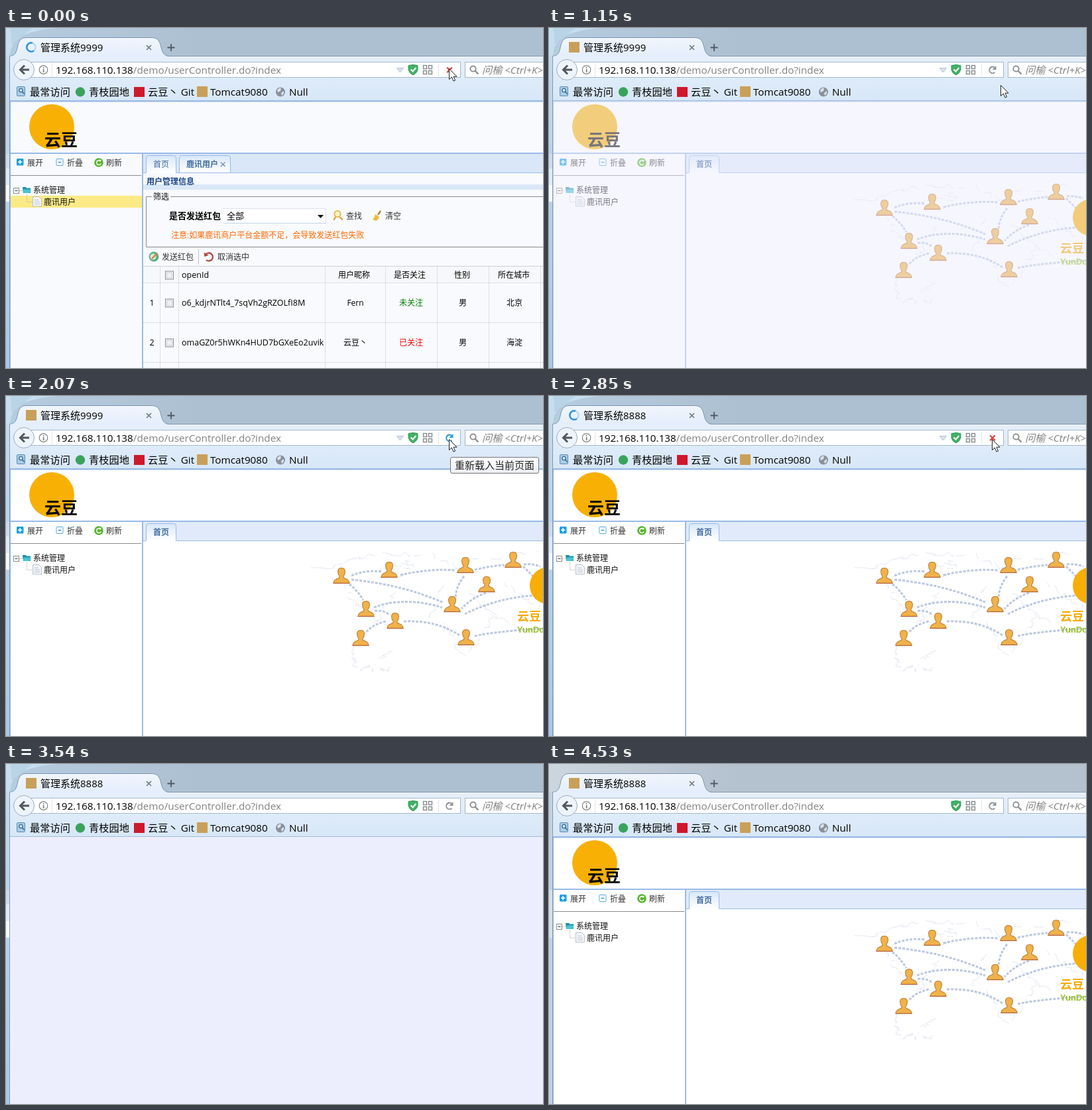
Write an HTML page that moves like this. It is 810 by 513 pixels and loops after 4630 ms.

```html
<!DOCTYPE html>
<html lang="zh">
<head>
<meta charset="utf-8">
<title>管理系统</title>
<style>
html, body { margin: 0; width: 100%; height: 100%; overflow: hidden; }
svg { display: block; width: 810px; height: 513px; font-family: "Open Sans", "Noto Sans CJK SC", "Noto Sans CJK", sans-serif; }
text { white-space: pre; }
</style>
</head>
<body>
<svg id="stage" viewBox="0 0 810 513" xmlns="http://www.w3.org/2000/svg"></svg>
<script>
const LOOP = 4630;
const stage = document.getElementById('stage');

const text = (x, y, s, size = 12, fill = '#111', more = '') =>
  `<text x="${x}" y="${y}" font-size="${size}" fill="${fill}" ${more}>${s}</text>`;
const rect = (x, y, w, h, fill, more = '') =>
  `<rect x="${x}" y="${y}" width="${w}" height="${h}" fill="${fill}" ${more}/>`;
const path = (d, stroke, w = 1, fill = 'none', more = '') =>
  `<path d="${d}" stroke="${stroke}" stroke-width="${w}" fill="${fill}" ${more}/>`;
const circle = (x, y, r, fill, stroke = 'none', w = 1) =>
  `<circle cx="${x}" cy="${y}" r="${r}" fill="${fill}" stroke="${stroke}" stroke-width="${w}"/>`;
const group = (id, body, more = '') => `<g id="${id}" ${more}>${body}</g>`;
const grad = (id, a, b, dir = 'x2="0" y2="1"') =>
  `<linearGradient id="${id}" ${dir}><stop stop-color="${a}"/><stop offset="1" stop-color="${b}"/></linearGradient>`;
const BOLD = 'font-weight="bold"';
const MID = 'text-anchor="middle"';
const LINE = '#99bbe8';
const UI = 15.25;

function random(seed) {
  return () => (seed = (seed * 16807) % 2147483647) / 2147483647;
}

function defs() {
  return '<defs>' + grad('tabFill', '#f1f6fd', '#e4eefb') + grad('bar', '#e6effb', '#d7e7f7') +
    grad('pageTab', '#d9e7f9', '#ffffff') + grad('tipFill', '#ffffff', '#eceef5') +
    grad('glass', '#b6cddf', '#adc0d2', 'x2="0.35"') + grad('side', '#c3d9ec', '#aac8e6') +
    grad('gray', '#ccd6df', '#b4c1ce', 'x2="0.35"') + '</defs>';
}

function frameBack() {
  const blue = rect(0, 0, 810, 513, 'url(#glass)') +
    path('M0 0H76Q40 3 17 15Q6 28 6 43H0Z', 'none', 0, '#c6deee') +
    path('M6 0H40L8 25V10Z', 'none', 0, '#b9d4e6') +
    rect(0, 43, 6, 470, 'url(#side)') + rect(0, 190, 6, 22, '#cbdcef') +
    rect(0, 212, 6, 25, '#dfeaf6') + rect(0, 237, 6, 25, '#f6fafd');
  const dull = rect(0, 0, 810, 513, 'url(#gray)') + rect(0, 43, 6, 470, '#c3d1df') +
    rect(0, 190, 6, 72, '#d5dfe9');
  return group('blueBack', blue) + group('dullBack', dull);
}

function chrome() {
  let s = rect(6, 43, 804, 67, 'url(#bar)') + rect(6, 43, 804, 1, '#f1f6fd') +
    path('M5.5 513V42.5', '#7f99b5') + path('M240 42.5H810', '#8098b0') +
    path('M5.5 42.5C17 42 16 31 19 22.5Q22 14.5 30 14.5H220Q229 14.5 232 22.5C235 31 235 42 246 42.5', '#7c94ad', 1, 'url(#tabFill)') +
    rect(8, 42, 234, 2, '#e5effb') +
    path('M212 26l7 7m0-7l-7 7', '#6f7983', 1.7) +
    path('M249 24v11m-5.5-5.5h11', '#4f5a64', 1.8);
  // address and search fields
  s += rect(37.5, 51.5, 648, 23, '#fff', 'stroke="#a6b7c8"') +
    rect(692.5, 51.5, 130, 23, '#fff', 'stroke="#a6b7c8"') +
    circle(27, 63, 15.5, '#eef4fc', '#9aadc0') +
    path('M35 63H22M28 56.5L21.5 63L28 69.5', '#50575e', 3) +
    circle(56.5, 63, 6.3, '#fff', '#858585', 1.2) + rect(55.8, 59, 1.6, 1.8, '#777') + rect(55.8, 62, 1.6, 5, '#777') +
    path('M69.5 53V74M652.5 55V73', '#c3cad2', 1, 'none', 'stroke-dasharray="1 1"') +
    text(75, 69, '192.168.110.138<tspan fill="#808080">/demo/userController.do?index</tspan>', UI, '#000') +
    path('M607 56.5L614 55.5L621 56.5V63Q620 68 614 71Q608 68 607 63Z', '#2b9a50', 1, '#40b266') +
    path('M610.5 62.5l3 3l5-5.5', '#fff', 2);
  for (const x of [629.5, 637.5]) for (const y of [56.5, 64.5]) s += rect(x, y, 5, 5, 'none', 'stroke="#858a90" stroke-width="1.4"');
  s += circle(704.5, 61.5, 4.2, 'none', '#888', 1.8) + path('M707.5 64.5l5 5', '#888', 2.2) +
    text(718, 69, '问榆 &lt;Ctrl+K&gt;', UI, '#808080', 'font-style="italic"');
  // bookmarks
  s += rect(16.5, 88.5, 12, 14, '#a9cbe8', 'stroke="#5b8db8" rx="1.5"') +
    circle(22.5, 94, 2.6, '#e5f1fa', '#33698f', 1.3) + path('M24.5 96l3 3.5', '#33698f', 1.6) +
    circle(112, 96.5, 7.2, '#3aa35b') + rect(193, 89, 16, 15, '#d0172b') + rect(288, 88, 16, 16, '#c9a05a') +
    circle(414, 96.5, 7, '#88929a') + path('M409 94q3-5 6-3l-1 4l-4 2zM415 98l4-3v4l-3 3z', 'none', 0, '#dce4ea');
  [[36, '最常访问'], [125, '青枝园地'], [214, '云豆丶 Git'], [308, 'Tomcat9080'], [427, 'Null']]
    .forEach(([x, v]) => s += text(x, 102, v, UI, '#000'));
  // parts that change
  s += group('favicon', rect(30, 21, 16, 16, '#c9a05a')) +
    group('spinner', circle(38, 29, 6.6, 'none', '#b5d8f2', 2.4) +
      group('arc', path('M42 34.2A6.6 6.6 0 1 1 40 22.7', '#2f95da', 2.4))) +
    '<text id="title" x="52" y="35" font-size="15" fill="#000"></text>' +
    group('drop', path('M589.5 60.5H599.5L594.5 67Z', '#b3c1ce', 1, '#dbe3ec')) +
    group('reload', path('M672.4 66.8A4.8 4.8 0 1 1 672 59.6', 'currentColor', 2) +
      path('M674.5 57V63H668.5Z', 'none', 0, 'currentColor')) +
    group('stop', path('M665.2 59.5l7.6 7.6m0-7.6l-7.6 7.6', '#d9493f', 2.4));
  return s;
}

function sidebar() {
  return rect(16, 197, 10.5, 10.5, '#1b9fe0', 'rx="1.5"') + path('M21.2 199v6.5M18 202.2h6.5', '#fff', 1.6) +
    text(32, 208, '展开', 12, '#333') +
    rect(76, 197.5, 10, 10, '#fff', 'stroke="#4fa9d8" rx="1"') + path('M78.5 202.5h5', '#2b8fc4', 1.3) +
    text(92, 208, '折叠', 12, '#333') +
    circle(140, 203, 6.8, '#55b52c') + path('M143.2 204.5A3.4 3.4 0 1 1 141.5 200', '#fff', 1.6) + path('M141 198v4l3.4-1.5z', 'none', 0, '#fff') +
    text(151, 208, '刷新', 12, '#333') + path('M7 222.5H204', '#8c8c8c') +
    path('M20 245.5H25M31.5 251V262.5H40', '#b0b0b0', 1, 'none', 'stroke-dasharray="1 1"') +
    rect(11.5, 241.5, 8, 8, '#fff', 'stroke="#8a8a8a"') + path('M13.5 245.5h4', '#333') +
    path('M25 240h5l1 1.5h6V249H26z', 'none', 0, '#1c8fa8') + path('M27 243.5h10.5L36 249H25.5z', 'none', 0, '#4cc3d6') +
    text(41, 249, '系统管理') +
    path('M40.5 254.5h9l4 4v10.5h-13z', '#b9bfc9', 1, '#f3f5f9') + path('M43 259.5h6M43 262.5h8M43 265.5h8', '#b5c0d3') +
    text(57, 267, '鹿讯用户');
}

const strip = fill => rect(207, 190, 603, 28, fill);
const pageTab = (x, w) => path(`M${x} 218.5V196Q${x} 192.5 ${x + 4} 192.5H${x + w - 4}Q${x + w} 192.5 ${x + w} 196V218.5`, LINE, 1, 'url(#pageTab)');

function coast() {
  const rnd = random(77);
  const runs = [[465, 262, 555, 240], [555, 240, 640, 238], [505, 285, 545, 330], [560, 262, 610, 250], [590, 290, 555, 345],
    [522, 378, 527, 412], [580, 385, 545, 408], [640, 240, 700, 268], [655, 285, 640, 340], [700, 245, 805, 238],
    [660, 340, 690, 395], [735, 330, 700, 390], [700, 300, 760, 345], [750, 280, 806, 320], [615, 255, 590, 275], [527, 412, 580, 413]];
  return runs.map(([x, y, u, v]) => {
    let d = '';
    for (let i = 0; i <= 14; i++) {
      const k = i / 14, px = x + (u - x) * k + rnd() * 10 - 5, py = y + (v - y) * k + rnd() * 8 - 4;
      d += (i && rnd() < 0.72 ? 'L' : 'M') + px.toFixed(1) + ' ' + py.toFixed(1);
    }
    return path(d, '#dfe4f1', 0.9);
  }).join('');
}

const person = (x, y) => `<g transform="translate(${x} ${y})">` +
  path('M-12 11.5Q-11.5 6-6 4.5Q-2.5 3.5-3 1Q-5.5-2-5.5-6.5Q-5-11.5 0-11.5Q5-11.5 5.5-6.5Q5.5-2 3 1Q2.5 3.5 6 4.5Q11.5 6 12 11.5Z', '#bd8238', 1.1, '#f0b24a') +
  path('M-12.5 11.5H12.5', '#b5623a', 1.3) + '</g>';

function home() {
  const links = 'M521 271Q542 262 567 265M595 270Q640 260 678 263M707 262Q735 256 752 255M781 254Q795 253 806 257M780 257L800 277' +
    'M518 284Q530 293 539 308M521 277Q600 285 660 312M555 319Q600 302 658 319M556 324Q570 323 578 330M573 340Q551 345 542 358' +
    'M600 340Q650 338 684 361M691 272Q680 285 678 303M724 297Q703 304 687 321M692 329Q740 305 795 301M707 362Q740 355 810 351';
  const people = [[506, 271], [578, 262], [693, 255], [765, 247], [725, 284], [543, 321], [587, 339], [673, 314], [535, 365], [694, 364]];
  return strip('#e0eafb') + pageTab(211.5, 45) + text(222, 210, '首页', 12, '#416da3', BOLD) + coast() +
    path(links, '#bcc8df', 3, 'none', 'stroke-dasharray="4 2"') +
    people.map(p => person(...p)).join('') + circle(818, 286, 28, '#f7ae05') +
    text(771, 339, '云豆', 18, '#f5ab0b', BOLD) +
    text(771, 357, 'YunDou', 13, '#97c125', BOLD + ' font-family="Liberation Sans, sans-serif"');
}

const check = y => rect(240.5, y - 6, 12, 12, '#fdfdfd', 'stroke="#85898f"') + rect(242.5, y - 4, 8, 8, '#eef0f2', 'stroke="#c9ced4"');

function users() {
  let s = strip('#d9e7f8') + pageTab(211.5, 45) + text(222, 210, '首页', 12, '#416da3') +
    pageTab(261.5, 77) + text(272, 210, '鹿讯用户', 12, '#416da3', BOLD) +
    path('M324 202.5l6.5 6.5m0-6.5l-6.5 6.5', '#6d8fbd', 1.4) +
    rect(207, 236, 603, 8, '#dae8f8') + text(212, 236, '用户管理信息', 12, '#15428b', BOLD) +
    path('M220 254.5H211.5V330.5H810M248 254.5H810', '#8a8a8a') + text(222, 259, '筛选') +
    text(246, 288, '是否发送红包', 13, '#000', BOLD) +
    rect(328, 272, 154, 22, '#fff') + path('M328 272.5H482.5V294', '#dbe2ec') + path('M328 294.5H482', '#c3d3e8') +
    text(333, 288, '全部', 13, '#000') + path('M470 282h9l-4.5 5z', 'none', 0, '#111') +
    circle(500, 280.5, 4.6, '#fff3c4', '#e8b548', 1.8) + path('M497 285l-2.5 5M503 285l5 4.5', '#dea136', 2.2) + text(513, 288, '查找', 12, '#333') +
    path('M565 276l-4 6', '#b58132', 2.4) + path('M557 281l6 4q-2 5-5 6l-5-2q3-3 4-8z', 'none', 0, '#eebc3a') + text(572, 288, '清空', 12, '#333') +
    text(249, 317, '注意:如果鹿讯商户平台金额不足，会导致发送红包失败', 12, '#ff6600');
  s += circle(223, 345, 7.5, '#5cb08c') + circle(222, 345, 4.5, '#d6ebdd') + path('M220 348l8-8', '#dd7c35', 2.4) +
    text(235, 350, '发送红包', 12, '#333') + path('M290.5 334V357', '#c4c4c4') +
    path('M301 342A6 6 0 1 1 302 350', '#b1423a', 2.2) + path('M298.5 338.5l1 6.5l6-2z', 'none', 0, '#b1423a') +
    text(319, 350, '取消选中', 12, '#333');
  // table
  s += rect(207, 360, 603, 24, '#f7f8fb') + path('M207 359.5H810', '#d2d2d2') +
    path('M207 384.5H810M207 444.5H810M207 504.5H810' + [232, 260, 481, 572, 650, 728, 806].map(x => `M${x}.5 360V513`).join(''),
      '#c6c6c6', 1, 'none', 'stroke-dasharray="1 1"');
  const cols = [525, 609, 688, 766];
  const head = ['用户昵称', '是否关注', '性别', '所在城市'];
  s += check(373) + text(265, 377, 'openId', 12.5, '#000') + head.map((v, i) => text(cols[i], 377, v, 12, '#000', MID)).join('');
  [['o6_kdjrNTlt4_7sqVh2gRZOLfI8M', 'Fern', '未关注', '#008000', '北京'],
   ['omaGZ0r5hWKn4HUD7bGXeEo2uvik', '云豆丶', '已关注', '#ff0000', '海淀']].forEach(([id, nick, state, tone, city], i) => {
    const y = 419 + i * 60;
    s += text(220, y, i + 1, 12.5, '#000', MID) + check(y - 4) + text(265, y, id, 12.5, '#000') +
      text(527, y, nick, 12, '#000', MID) + text(611, y, state, 12, tone, MID) +
      text(689, y, '男', 12, '#000', MID) + text(767, y, city, 12, '#000', MID);
  });
  return s;
}

function page() {
  return '<rect id="paper" x="6" y="110" width="804" height="403"/>' +
    group('home', home()) + group('users', users()) +
    path('M207 218.5H211M340 218.5H810', LINE) + path('M257 218.5H340', LINE) +
    path('M6 110.5H810M6 189H810M206 189V513', LINE, 2) + path('M6.5 110V513', LINE) +
    circle(69, 149, 34, '#f8b005') + text(58, 178, '云豆', 25, '#0a0a0a', BOLD) +
    group('mark', rect(7, 253, 198, 18, '#fbea85')) + sidebar();
}

stage.innerHTML = defs() + frameBack() + chrome() + rect(6, 109, 804, 1, '#a3bbd6') +
  rect(6, 110, 804, 403, '#edeefd') + group('page', page()) +
  group('tip', rect(670.5, 92.5, 133, 24, 'url(#tipFill)', 'stroke="#767676" rx="2.5"') + text(677, 110, '重新载入当前页面', 15, '#222')) +
  group('cursor', path('M.5 .5V16.5L4.3 13L7 19L9.6 18L7 12.2H12Z', '#222', 1, '#fff'));

// each step lists only what changes
const steps = [
  [0, { view: 'users', fade: 1, spin: 0, load: true, name: 9999, cur: [668, 61], hover: false, tip: false, drop: true, dull: false }],
  [120, { spin: 70 }],
  [400, { fade: 0, view: 'home', spin: 150 }],
  [540, { spin: 220, cur: [680, 88] }],
  [660, { load: false, cur: [690, 108] }],
  [1030, { fade: 0.25, cur: [688, 100] }],
  [1150, { fade: 0.52, cur: [681, 86] }],
  [1300, { fade: 0.78, cur: [678, 79] }],
  [1450, { fade: 1, cur: [668, 65], hover: true }],
  [2070, { tip: true }],
  [2540, { tip: false, load: true, spin: 200 }],
  [2690, { name: 8888, spin: 280 }],
  [2850, { spin: 0 }],
  [3120, { fade: 0, spin: 40 }],
  [3270, { spin: 120, cur: [715, 140] }],
  [3400, { load: false, hover: false, cur: [798, 257] }],
  [3540, { drop: false, cur: null }],
  [3820, { fade: 0.35 }],
  [3970, { fade: 0.62, cur: [805, 509] }],
  [4090, { fade: 0.85, cur: null }],
  [4250, { fade: 1 }],
  [4530, { dull: true }]
];

const el = {};
stage.querySelectorAll('[id]').forEach(e => el[e.id] = e);
const show = (id, on) => el[id].setAttribute('display', on ? 'inline' : 'none');

function draw(t) {
  const s = Object.assign({}, ...steps.filter(p => p[0] <= t).map(p => p[1]));
  const list = s.view === 'users';
  show('users', list); show('mark', list); show('home', !list);
  el.paper.setAttribute('fill', list ? '#f8fafd' : '#ffffff');
  el.page.setAttribute('opacity', s.fade);
  show('spinner', s.load); show('stop', s.load);
  show('favicon', !s.load); show('reload', !s.load);
  el.arc.setAttribute('transform', `rotate(${s.spin} 38 29)`);
  el.reload.setAttribute('color', s.hover ? '#2299d6' : '#8e959c');
  el.title.textContent = '管理系统' + s.name;
  show('drop', s.drop); show('tip', s.tip);
  show('dullBack', s.dull); show('blueBack', !s.dull);
  show('cursor', s.cur);
  if (s.cur) el.cursor.setAttribute('transform', `translate(${s.cur})`);
}

function tick() {
  draw(performance.now() % LOOP);
  requestAnimationFrame(tick);
}
tick();
</script>
</body>
</html>
```
